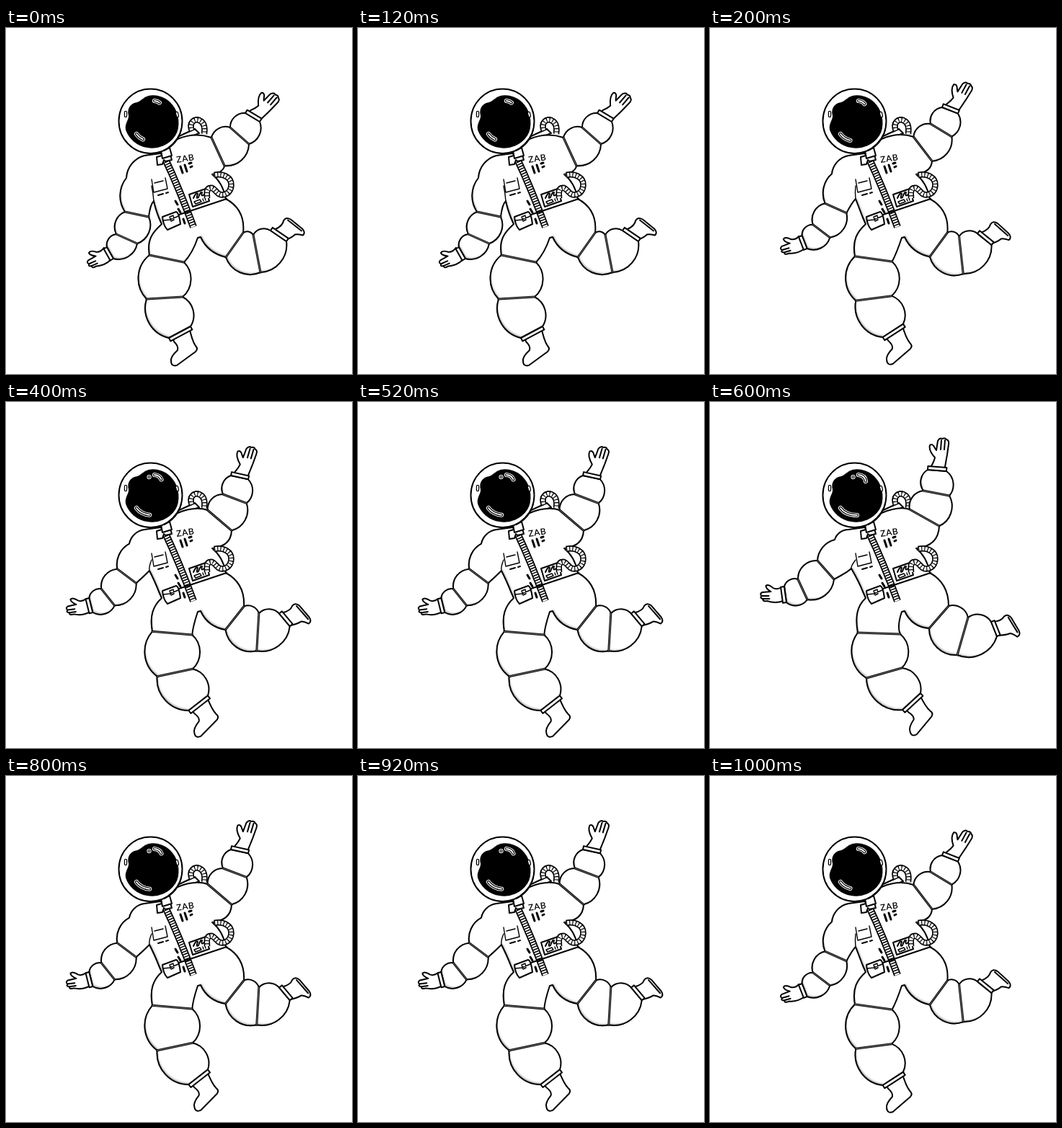
Recreate the animation shown at these times as an HTML page. Size 480x480 px, loop 1.2 s.

```html
<!DOCTYPE html>
<html lang="en">
<head>
<meta charset="utf-8">
<title>Floating astronaut</title>
<style>
html, body { margin: 0; width: 100%; height: 100%; overflow: hidden; background: #fff; }
svg { display: block; width: 100vw; height: 100vh; }
path { fill: none; stroke: #000; stroke-width: 2; stroke-linejoin: round; stroke-linecap: round; }
.skin { fill: #fff; filter: url(#shade); }
.plain { fill: #fff; }
.ink { fill: #000; }
.fine { stroke-width: 1.4; }
.bold { stroke-width: 3; }
.seam { stroke-width: 3; }
.glint { stroke: #b5b5b5; stroke-width: .7; }
text { font: 600 12px Lato, "Open Sans", sans-serif; letter-spacing: .6px; }

.pose { visibility: hidden; animation: 1.2s step-end infinite; }
.p0 { animation-name: p0; }
.p1 { animation-name: p1; }
.p2 { animation-name: p2; }
.p3 { animation-name: p3; }
@keyframes p0 { 0% { visibility: visible } 16.666%, 100% { visibility: hidden } }
@keyframes p1 { 0%, 33.333% { visibility: hidden } 16.666%, 83.333%, 100% { visibility: visible } }
@keyframes p2 { 0%, 50%, 83.333%, 100% { visibility: hidden } 33.333%, 66.666% { visibility: visible } }
@keyframes p3 { 0%, 66.666%, 100% { visibility: hidden } 50% { visibility: visible } }
</style>
</head>
<body>
<svg id="stage" viewBox="0 0 480 480">
  <defs>
    <filter id="shade" x="-10%" y="-10%" width="120%" height="120%" color-interpolation-filters="sRGB">
      <feGaussianBlur in="SourceAlpha" stdDeviation=".9"/>
      <feOffset dx="2.2" dy="-3.4" result="lit"/>
      <feFlood flood-color="#b4b4b4"/>
      <feComposite operator="out" in2="lit"/>
      <feComposite operator="in" in2="SourceAlpha" result="dim"/>
      <feBlend in="dim" in2="SourceGraphic" mode="multiply"/>
    </filter>
  </defs>
</svg>
<script>
// Each limb swings between two key poses, given as three seams (two points each).
// Tips are drawn around the middle of the last seam and turn by `turn` degrees.
const limbs = {
  highArm: {
    from: [285,152, 303,191, 311,138, 337,161, 332,118, 352,130],
    to: [277,149, 318,172, 296,123, 332,130, 302,94, 328,96],
    turn: [36, 0], ease: 1,
    tip: 'M-8-6Q-4-13-3-18Q-12-28-10-35Q-6-38-3-31L-1-28L1-41Q4-46 7-44Q11-46 13-43Q17-42 16-36L14-22L11-5M6-42L5-29M11-42L10-29'
  },
  lowArm: {
    from: [198,262, 165,255, 182,299, 153,286, 149,320, 140,304],
    to: [172,246, 149,220, 135,274, 122,246, 106,278, 103,256],
    turn: [-24, 0], ease: 1,
    tip: 'M-5-10Q-12-6-17-9Q-24-15-27-12Q-27-8-20-4L-32-3Q-36-1-33 2Q-36 5-31 6Q-32 10-25 9Q-14 13-3 9M-33 2H-23M-31 6H-22'
  },
  longLeg: {
    from: [247,325, 199,315, 245,373, 195,376, 256,414, 226,430],
    to: [264,322, 205,320, 266,369, 217,383, 292,404, 267,427],
    turn: [0, -14], ease: 1,
    tip: 'M-13-2L-8 13Q-1 20-3 25Q-13 34-12 40Q-12 48-4 46L22 27Q26 23 22 19Q17 12 13-8'
  },
  kickLeg: {
    from: [329,284, 305,318, 343,287, 353,339, 367,281, 389,296],
    to: [331,283, 304,314, 358,299, 343,351, 390,305, 398,325],
    turn: [0, 20], ease: 1.6,
    tip: 'M-13-4L-5-9Q6-14 7-21Q10-27 17-23L33-10Q38-5 34-1Q26-3 23-2Q18 3 4 8M13-22L32-7'
  }
};

const path = (d, cls = '', extra = '') => `<path class="${cls}" d="${d}" ${extra}/>`;
const line = (d, color, width, extra = '') => `<path d="${d}" style="stroke:${color};stroke-width:${width};${extra}"/>`;
const lerp = (a, b, t) => a + (b - a) * t;
const mix = (p, q, t) => p.map((v, i) => lerp(v, q[i], t));
const dist = (p, q) => Math.hypot(q[0] - p[0], q[1] - p[1]);

// Clockwise bulge from p to q; a larger k is flatter.
const arc = (p, q, k = .68) => `A${k * dist(p, q)} ${k * dist(p, q)} 0 0 1 ${q}`;

function joints({ from, to, ease }, time) {
  const v = mix(from, to, time ** ease);
  return [0, 2, 4, 6, 8, 10].map(i => v.slice(i, i + 2));
}

const round = ([a, b, c, d, e, f]) => `L${a}${arc(a, c)}${arc(c, e)}L${f}${arc(f, d)}${arc(d, b)}`;

function seam(a, b) {
  const d = `M${a}L${b}`;
  return path(d, 'seam') + path(d, 'glint');
}

function cuff(a, b) {
  const s = 5 / dist(a, b), nx = (b[1] - a[1]) * s, ny = (a[0] - b[0]) * s;
  return path(`M${a}L${b}l${nx} ${ny}L${a[0] + nx} ${a[1] + ny}Z`, 'plain');
}

function body(t, [high, low, long, kick]) {
  const pit = mix([205, 240], [196, 231], t), notch = mix([167, 208], [173, 191], t);
  const hip = long[1], under = high[1], shoulder = [192, 177];
  return path(`M238 154Q262 144 ${high[0]}${round(high)}Q${under[0] - 1} 200 286 203` +
    `Q301 215 305 237C325 248 331 265 ${kick[0]}${round(kick)}Q280 312 270 290L266 291` +
    `Q259 312 ${long[0]}${round(long)}C${hip[0] - 4} ${hip[1] - 22} 204 283 216 272` +
    `L212 263Q207 250 ${pit}Q${pit[0] - 5} ${pit[1] + 5} ${low[0]}${round(low)}` +
    `${arc(low[1], notch, .85)}${arc(notch, shoulder, .85)}L214 174`, 'skin') +
    path(`M${pit}Q${pit[0] - 1} 228 202 219`, 'fine');
}

function pose(t) {
  const parts = Object.values(limbs), points = parts.map(l => joints(l, t));
  const tips = parts.map((l, k) => {
    const [x, y] = mix(points[k][4], points[k][5], .5), turn = lerp(...l.turn, t ** l.ease);
    return path(l.tip, 'plain', `transform="translate(${x} ${y}) rotate(${turn})"`);
  });
  const bands = points.map(([a, b, c, d, e, f]) => seam(a, b) + seam(c, d) + cuff(e, f));
  return tips.join('') + body(t, points) + bands.join('');
}

// Outlined bean shape, of which only a share of the length shows.
function bean(d, share = 1) {
  return [['#fff', 6.2], ['#000', 4.2], ['#fff', 1.8]].map(([color, width]) =>
    path(d, '', `pathLength="1" style="stroke:${color};stroke-width:${width};stroke-dasharray:${share} 2"`)).join('');
}

function shine(t) {
  return bean('M206 101q9 1 10 9', .5 + t / 2) + bean('M181 147q7 10 23 10', .45 + t * .55) +
    (t > .5 ? bean('M198.500 104h.1') : '');
}

const frames = draw => [0, 1, 2, 3].map(i => `<g class="pose p${i}">${draw(i / 3)}</g>`).join('');

const ribbed = (d, w, dash) => line(d, '#000', w, 'stroke-linecap:butt') +
  line(d, '#fff', w - 3.4, 'stroke-linecap:butt') +
  line(d, '#000', w - 2.6, `stroke-linecap:butt;stroke-dasharray:${dash}`);

const pack = path('M236 152L262 140L268 146L240 157', 'plain') +
  ribbed('M258 143C253 131 262 125 268 128C276 131 276 140 275 147', 8.5, '1.2 3');

const rim = 'M166 117v5M237 118l1 4';
const helmet = path('M215 170L217 181L230 177L227 166Z', 'plain') +
  '<ellipse cx="200.500" cy="129.200" rx="44" ry="44.700" fill="#fff" stroke="#000" stroke-width="2"/>' +
  path('M243 142Q238 161 220 170', 'fine') +
  path('M198 95C209 92 223 98 230 107C240 119 241 138 234 149C226 161 211 168 196 165C182 163 171 153 167 141C165 132 172 128 171 121C168 111 175 105 182 104C188 103 190 97 198 95Z', 'ink') +
  line(rim, '#000', 4.4) + line(rim, '#fff', 1.9);

const details =
  ribbed('M221 182Q240 222 260 276', 10, '1.5 2') +
  path('M209 179L216 177L215 174L228 176L230 183L221 185L219 183L217 189L210 190Z', 'plain') +
  path('M202 210L205 228L224 223L221 208M206 215L218 212', 'fine') +
  path('M211 232L218 230M222 229L225 228') +
  '<text transform="translate(237 187) rotate(-9)">ZAB</text>' +
  path('M242 192L245 201M248 190L251 199M254 188L257 187M256 193L258 192', 'bold') +
  path('M235 240L238 245M239 251L242 256M246 265L248 271', 'bold') +
  path('M240 259L306 237') +
  path('M254 231L277 223L282 240L259 248Z', 'plain') +
  path('M260 236Q264 227 266 230Q263 238 267 235Q270 226 272 228Q270 235 275 231') +
  path('M261 241L269 238L271 241L263 244ZM273 237L274 240M276 236L277 239', 'fine') +
  ribbed('M289 204C302 201 313 208 312.500 218C312 229 302 234 295 230C289 225 288 221 283 222C277 223 279 231 279 236', 8.5, '1.2 3') +
  path('M217 262L236 255Q240 256 242 272L224 280Q218 274 217 262Z', 'plain') +
  path('M218 267L227 266L239 261M227 262L232 260L233 266L229 268Z', 'fine');

document.getElementById('stage').insertAdjacentHTML('beforeend',
  pack + frames(pose) + details + helmet + frames(shine));
</script>
</body>
</html>
```
